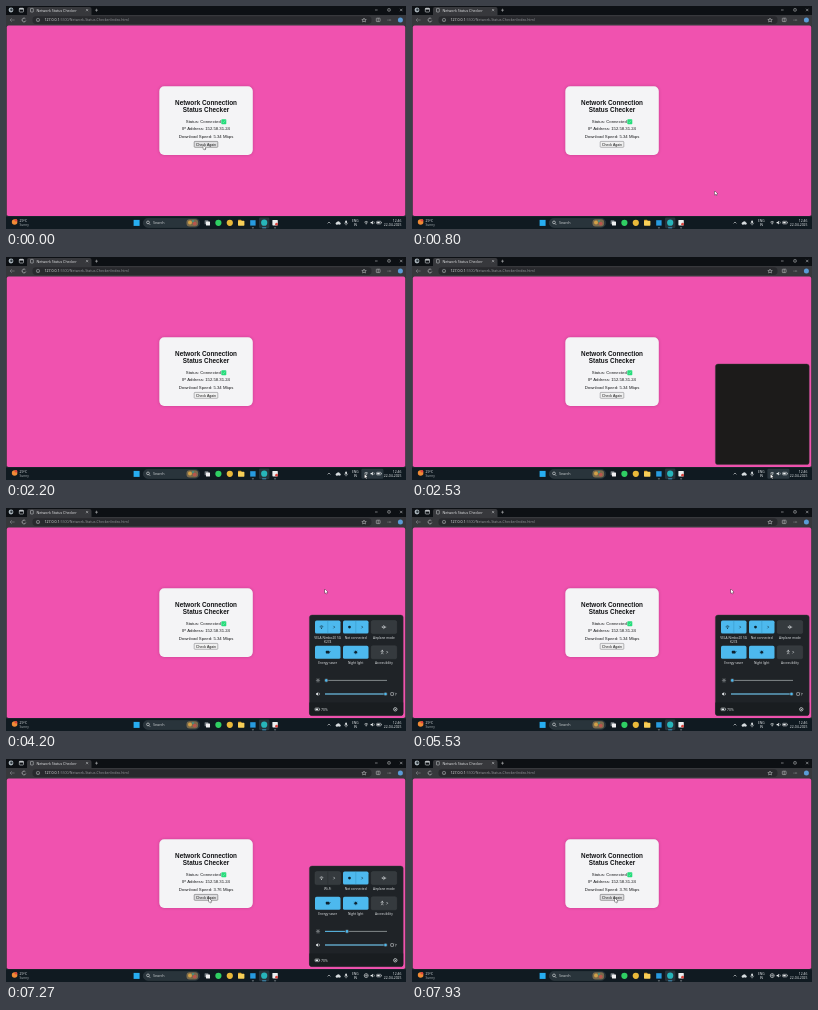
Recreate the animation shown at these times as an HTML page with a canvas. Size 400 by 223 pixels, loop 8 s.

```html
<!DOCTYPE html>
<html lang="en">
<head>
<meta charset="utf-8">
<title>Network Status Checker</title>
<style>
html, body { margin: 0; width: 100%; height: 100%; overflow: hidden; background: #10191f; }
canvas { display: block; width: 100vw; height: 100vh; }
</style>
</head>
<body>
<canvas id="stage"></canvas>
<script>
const W = 400, H = 223, LOOP = 8000;
const canvas = document.getElementById('stage');
const ctx = canvas.getContext('2d');
const SANS = '"Liberation Sans", Arial, sans-serif';
const UI = '"Open Sans", "Noto Sans", sans-serif';
const BLUE = '#4db9ee', INK = '#0d2230', PALE = '#e4e8ea', TILE = '#353a3e';

// Cursor path: time, x, y
const PATH = [
  [0, 197.3, 139.3], [70, 197.3, 139.3], [870, 305, 186], [1400, 358.6, 217.2],
  [3000, 358.6, 217.2], [3800, 318.9, 81.3], [5600, 318.9, 81.3],
  [6050, 315, 118], [6350, 315, 118], [6950, 203, 139.3], [LOOP, 203, 139.3]
];
const T = { panel: 2530, content: 3000, wifiOff: 6150, result: 7130, close: 7330, closed: 7530 };

const clamp = v => Math.max(0, Math.min(1, v));
const ease = v => v * v * (3 - 2 * v);
const span = (t, a, b) => ease(clamp((t - a) / (b - a)));

function cursorAt(t) {
  let i = 1;
  while (i < PATH.length - 1 && t > PATH[i][0]) i++;
  const [t0, x0, y0] = PATH[i - 1], [t1, x1, y1] = PATH[i];
  const k = span(t, t0, t1);
  return [x0 + (x1 - x0) * k, y0 + (y1 - y0) * k];
}

function rect(x, y, w, h, fill) {
  ctx.fillStyle = fill;
  ctx.fillRect(x, y, w, h);
}
function round(x, y, w, h, r, fill, stroke, lw = 0.5) {
  ctx.beginPath();
  ctx.roundRect(x, y, w, h, r);
  if (fill) { ctx.fillStyle = fill; ctx.fill(); }
  if (stroke) { ctx.strokeStyle = stroke; ctx.lineWidth = lw; ctx.stroke(); }
}
function disc(x, y, r, fill) {
  ctx.beginPath();
  ctx.arc(x, y, r, 0, 7);
  ctx.fillStyle = fill;
  ctx.fill();
}
function ring(x, y, r, color, lw = 0.6, a = 0, b = 6.3) {
  ctx.beginPath();
  ctx.arc(x, y, r, a, b);
  ctx.strokeStyle = color;
  ctx.lineWidth = lw;
  ctx.stroke();
}
function line(color, lw, ...p) {
  ctx.beginPath();
  for (let i = 0; i < p.length; i += 2) ctx.lineTo(p[i], p[i + 1]);
  ctx.strokeStyle = color;
  ctx.lineWidth = lw;
  ctx.stroke();
}
function shape(fill, ...p) {
  ctx.beginPath();
  for (let i = 0; i < p.length; i += 2) ctx.lineTo(p[i], p[i + 1]);
  ctx.closePath();
  ctx.fillStyle = fill;
  ctx.fill();
}
function text(s, x, y, size, color, align = 'left', family = UI, weight = 400) {
  ctx.font = `${weight} ${size}px ${family}`;
  ctx.textAlign = align;
  ctx.fillStyle = color;
  ctx.fillText(s, x, y);
}

function wifi(x, y, color) {
  for (const r of [1.3, 2.5]) ring(x, y + 1.4, r, color, 0.6, -2.4, -0.75);
  disc(x, y + 1.2, 0.55, color);
}
function globe(x, y, color) {
  ring(x, y, 2, color, 0.5);
  line(color, 0.4, x - 2, y, x + 2, y);
  line(color, 0.4, x, y - 2, x, y + 2);
}
function speaker(x, y, color) {
  shape(color, x - 2, y - 0.7, x - 1, y - 0.7, x + 0.2, y - 1.9, x + 0.2, y + 1.9, x - 1, y + 0.7, x - 2, y + 0.7);
  ring(x, y, 1.6, color, 0.5, -0.8, 0.8);
}
function battery(x, y, color) {
  round(x - 2.4, y - 1.3, 4.4, 2.6, 0.6, null, color);
  rect(x - 1.8, y - 0.7, 2.5, 1.4, color);
  rect(x + 2.2, y - 0.5, 0.5, 1, color);
}
function sun(x, y, color) {
  ring(x, y, 0.9, color, 0.5);
  for (let a = 0; a < 8; a++) {
    const c = Math.cos(a * Math.PI / 4), s = Math.sin(a * Math.PI / 4);
    line(color, 0.4, x + c * 1.5, y + s * 1.5, x + c * 2.1, y + s * 2.1);
  }
}
function plane(x, y, color) {
  line(color, 0.7, x - 2, y, x + 2.2, y);
  line(color, 0.6, x - 0.5, y - 2, x + 0.6, y, x - 0.5, y + 2);
  line(color, 0.5, x - 2, y - 0.8, x - 1.5, y, x - 2, y + 0.8);
}
function chevron(x, y, color) {
  line(color, 0.6, x - 0.5, y - 1.2, x + 0.7, y, x - 0.5, y + 1.2);
}

function browser() {
  rect(0, 0, W, 21, '#0d1014');
  disc(5, 4, 2.4, '#a9b4bb');
  disc(5.4, 3.8, 1.2, '#343d43');
  round(13.3, 2.2, 4.2, 3.8, 0.7, null, '#d6dadd', 0.6);
  rect(13.3, 2.2, 4.2, 1.3, '#d6dadd');
  round(21, 1, 64.5, 10, [2, 2, 0, 0], '#37383c');
  round(24.5, 2.4, 2.8, 3.6, 0.4, null, '#cfd2d4');
  text('Network Status Checker', 30.5, 5.6, 3.6, '#e7e8ea');
  line('#c8cacc', 0.5, 80, 3, 82.2, 5.2);
  line('#c8cacc', 0.5, 82.2, 3, 80, 5.2);
  line('#c8cacc', 0.5, 89, 4.2, 92, 4.2);
  line('#c8cacc', 0.5, 90.5, 2.7, 90.5, 5.7);
  line('#d4d6d8', 0.5, 369, 4, 371.6, 4);
  round(381.8, 2.7, 2.4, 2.4, 0.3, null, '#d4d6d8');
  line('#d4d6d8', 0.5, 394, 2.8, 396.4, 5.2);
  line('#d4d6d8', 0.5, 396.4, 2.8, 394, 5.2);

  rect(0, 9, W, 11, '#37383c');
  line('#85878b', 0.6, 8.6, 14, 4, 14);
  line('#85878b', 0.6, 5.8, 12.2, 4, 14, 5.8, 15.8);
  ring(18, 14, 1.9, '#cfd1d3', 0.6, 0.3, 5.5);
  round(26.5, 10.2, 339, 7.8, 3.4, '#28292d');
  ring(32, 14, 1.7, '#b9bcbf', 0.5);
  line('#b9bcbf', 0.5, 32, 13.7, 32, 15);
  text('127.0.0.1', 38.5, 15.3, 3.55, '#f1f1f2');
  const w = ctx.measureText('127.0.0.1').width;
  text(':5500/Network-Status-Checker/index.html', 38.5 + w, 15.3, 3.55, '#96989c');
  line('#c9cbcd', 0.5, 358, 12, 358.7, 13.5, 360.3, 13.6, 359.1, 14.6, 359.5, 16, 358, 15.2, 356.6, 16, 357, 14.6, 355.8, 13.6, 357.4, 13.5, 358, 12);
  round(370.3, 12.2, 3.8, 3.4, 0.5, null, '#c9cbcd');
  line('#c9cbcd', 0.5, 372.2, 12.2, 372.2, 15.6);
  for (let i = 0; i < 3; i++) disc(382 + i * 1.4, 14, 0.4, '#c9cbcd');
  disc(394.4, 14, 2.5, '#5b9bd6');
}

function page(t, x, y) {
  rect(0, 19, W, 192, '#37383c');
  round(0.8, 19.6, 398.4, 190.4, 1.8, '#f052af');
  ctx.save();
  ctx.shadowColor = 'rgba(60,0,40,.25)';
  ctx.shadowBlur = 3 * canvas.width / W;
  round(153.3, 80.3, 93.5, 68.6, 4.8, '#f4f4f6');
  ctx.restore();
  text('Network Connection', 200, 99, 6.37, '#111214', 'center', SANS, 700);
  text('Status Checker', 200, 106, 6.37, '#111214', 'center', SANS, 700);
  text('Status: Connected', 179.8, 117.3, 4.25, '#18191b', 'left', SANS);
  round(215.3, 113.2, 5, 5, 0.8, '#25dc7b');
  line('#8cf0b8', 0.6, 216.5, 115.8, 217.4, 116.7, 219.2, 114.6);
  text('IP Address: 152.58.31.24', 200, 124.4, 4.25, '#18191b', 'center', SANS);
  const speed = t < T.result ? '5.34' : '3.76';
  text(`Download Speed: ${speed} Mbps`, 200, 131.8, 4.25, '#18191b', 'center', SANS);
  const hover = x > 188 && x < 212 && y > 135 && y < 142;
  round(188.2, 135.4, 23.6, 5.9, 0.7, hover ? '#dfdfe1' : '#f0f0f0', hover ? '#505052' : '#77777a');
  text('Check Again', 200, 139.6, 3.53, '#111', 'center', SANS);
}

function tile(x, y, label, on, split, more) {
  const fg = on ? INK : PALE;
  round(x, y, 25.5, 13, 1.6, on ? BLUE : TILE, on ? null : '#42474b', 0.4);
  if (split) {
    line(on ? '#318bb8' : '#25292c', 0.4, x + 12.8, y, x + 12.8, y + 13);
    chevron(x + 19, y + 6.5, fg);
  }
  label.split('\n').forEach((s, i) => text(s, x + 12.7, y + 18.2 + i * 4.6, 3.2, PALE, 'center'));
  return fg;
}

function slider(y, knob) {
  line('#8d9295', 0.9, 319, y, 381, y);
  line(BLUE, 0.9, 319, y, knob, y);
  disc(knob, y, 2.1, '#454a4e');
  disc(knob, y, 1.3, BLUE);
}

function panel(t) {
  if (t < T.panel || t >= T.closed) return;
  ctx.save();
  ctx.beginPath();
  ctx.rect(0, 0, W, 210);
  ctx.clip();
  ctx.translate(0, 104 * span(t, T.close, T.closed));
  const ready = t >= T.content;
  round(303.4, 107, 93.8, 100.6, 2.6, ready ? '#1f2327' : '#1c1b1a', '#3a3a3b', 0.4);
  if (ready) {
    const on = t < T.wifiOff;
    let c = tile(309, 112.6, on ? 'VELA Nimbo20 5G\nK274' : 'Wi-Fi', on, true);
    wifi(315.5, 119, c);
    tile(337, 112.6, 'Not connected', true, true);
    disc(343.5, 119.1, 1.4, INK);
    c = tile(365.2, 112.6, 'Airplane mode', false);
    plane(378, 119.1, c);
    c = tile(309, 137.8, 'Energy saver', true);
    round(319.8, 142.8, 3.6, 2.6, 0.6, c);
    line(c, 0.5, 323, 145.4, 324.4, 143);
    c = tile(337, 137.8, 'Night light', true);
    disc(349.7, 144.2, 1.3, c);
    sun(349.7, 144.2, c);
    c = tile(365.2, 137.8, 'Accessibility', false);
    disc(376.2, 142.4, 0.6, c);
    line(c, 0.5, 374.6, 143.6, 377.8, 143.6);
    line(c, 0.5, 375.2, 146.2, 376.2, 144.4, 377.2, 146.2);
    chevron(381, 144.2, c);

    sun(312, 172.4, PALE);
    slider(172.4, 320.3 + 20.7 * span(t, T.wifiOff + 50, T.wifiOff + 230));
    speaker(312, 186, PALE);
    slider(186, 379.5);
    round(384.7, 184.6, 2.8, 2.8, 0.4, null, PALE);
    chevron(389.7, 186, PALE);
    ctx.save();
    ctx.beginPath();
    ctx.roundRect(303.4, 107, 93.8, 100.6, 2.6);
    ctx.clip();
    rect(303, 194.5, 95, 14, '#191d20');
    ctx.restore();
    battery(311.4, 201.3, PALE);
    text('70%', 315, 202.6, 3.4, PALE);
    ring(389.3, 201.3, 1.7, PALE, 0.7);
    disc(389.3, 201.3, 0.6, PALE);
  }
  ctx.restore();
}

function taskbar(t, x, y) {
  rect(0, 210, W, 13, '#101a21');
  rect(0, 210, W, 0.4, '#2a343b');
  disc(8.6, 216, 2.8, '#f08b35');
  disc(10, 214.3, 1.3, '#e2483d');
  text('29°C', 13.4, 215.8, 3.5, '#e8ecee');
  text('Sunny', 13.4, 220, 3.3, '#a5adb2');

  rect(127.6, 213.9, 6, 6, '#27adf0');
  round(137.3, 212.4, 56.4, 9, 4.5, '#29343b', '#3a454c', 0.4);
  ring(142, 216.4, 1.4, PALE, 0.6);
  line(PALE, 0.6, 143, 217.5, 144.2, 218.8);
  text('Search', 147, 218.2, 3.7, '#d3d8da');
  round(180.5, 213.3, 11.6, 7.2, 3, '#7a6a4c');
  disc(184, 216.6, 2, '#d0a047');
  disc(188.7, 217.6, 1.9, '#b8554c');
  disc(187, 215, 1.2, '#508a78');

  round(198.6, 214.2, 3.8, 4, 0.5, '#737c82');
  round(200, 215.6, 4, 4, 0.5, '#eef0f1');
  disc(212.4, 216.8, 3.1, '#2fcf63');
  disc(223.8, 216.8, 3.1, '#e9b93a');
  round(232, 213.8, 3.4, 2, 0.5, '#d89b25');
  round(232, 214.8, 6.4, 4.9, 0.6, '#f7cf58');
  rect(244.2, 214.2, 5.4, 5.4, '#279be0');
  round(253, 211.6, 10.4, 10.6, 1.4, '#27333b');
  disc(258.2, 216.7, 3.1, '#27b5ba');
  round(266.4, 214, 5.4, 5.4, 0.6, '#eceeef');
  disc(270.6, 218.2, 1.4, '#d9453f');
  for (const [u, w] of [[245.8, 2.2], [256, 4.4], [268, 2.2]]) round(u, 221.4, w, 0.8, 0.4, w > 3 ? BLUE : '#98a1a7');

  line(PALE, 0.6, 321.6, 217.4, 323, 216, 324.4, 217.4);
  disc(330.9, 217.5, 1.2, '#d8dde0');
  disc(332.3, 216.8, 1.6, '#d8dde0');
  disc(333.7, 217.6, 1.1, '#d8dde0');
  round(339.3, 214.4, 1.6, 3.2, 0.8, PALE);
  ring(340.1, 216.6, 1.7, PALE, 0.4, 0, 3.14);
  line(PALE, 0.4, 340.1, 218.3, 340.1, 219.4);
  text('ENG', 349.3, 215.7, 3.2, '#e8ecee', 'center');
  text('IN', 349.3, 220, 3.2, '#e8ecee', 'center');
  if (x > 355 && y > 211) round(355.4, 211.8, 22, 10, 1.4, '#2a363e');
  (t < T.wifiOff ? wifi : globe)(360.2, 216.6, '#f0f3f4');
  speaker(366.6, 216.6, '#f0f3f4');
  battery(373, 216.6, '#f0f3f4');
  text('12:46', 395.5, 215.7, 3.4, '#e8ecee', 'right');
  text('22-04-2025', 395.5, 220.1, 3.4, '#e8ecee', 'right');
}

function cursor(x, y) {
  ctx.save();
  ctx.translate(x, y);
  ctx.lineJoin = 'round';
  const p = [0, 0, 0, 3.9, 0.9, 3.1, 1.5, 4.5, 2.1, 4.2, 1.5, 2.9, 2.7, 2.8];
  line('#222', 0.7, ...p, 0, 0);
  shape('#fff', ...p);
  ctx.restore();
}

function draw(t) {
  const dpr = window.devicePixelRatio || 1;
  const w = Math.round(innerWidth * dpr), h = Math.round(innerHeight * dpr);
  if (canvas.width !== w || canvas.height !== h) { canvas.width = w; canvas.height = h; }
  ctx.setTransform(w / W, 0, 0, h / H, 0, 0);
  const [x, y] = cursorAt(t);
  browser();
  page(t, x, y);
  panel(t);
  taskbar(t, x, y);
  cursor(x, y);
}

const start = performance.now();
function tick() {
  draw((performance.now() - start) % LOOP);
  requestAnimationFrame(tick);
}
tick();
</script>
</body>
</html>
```
